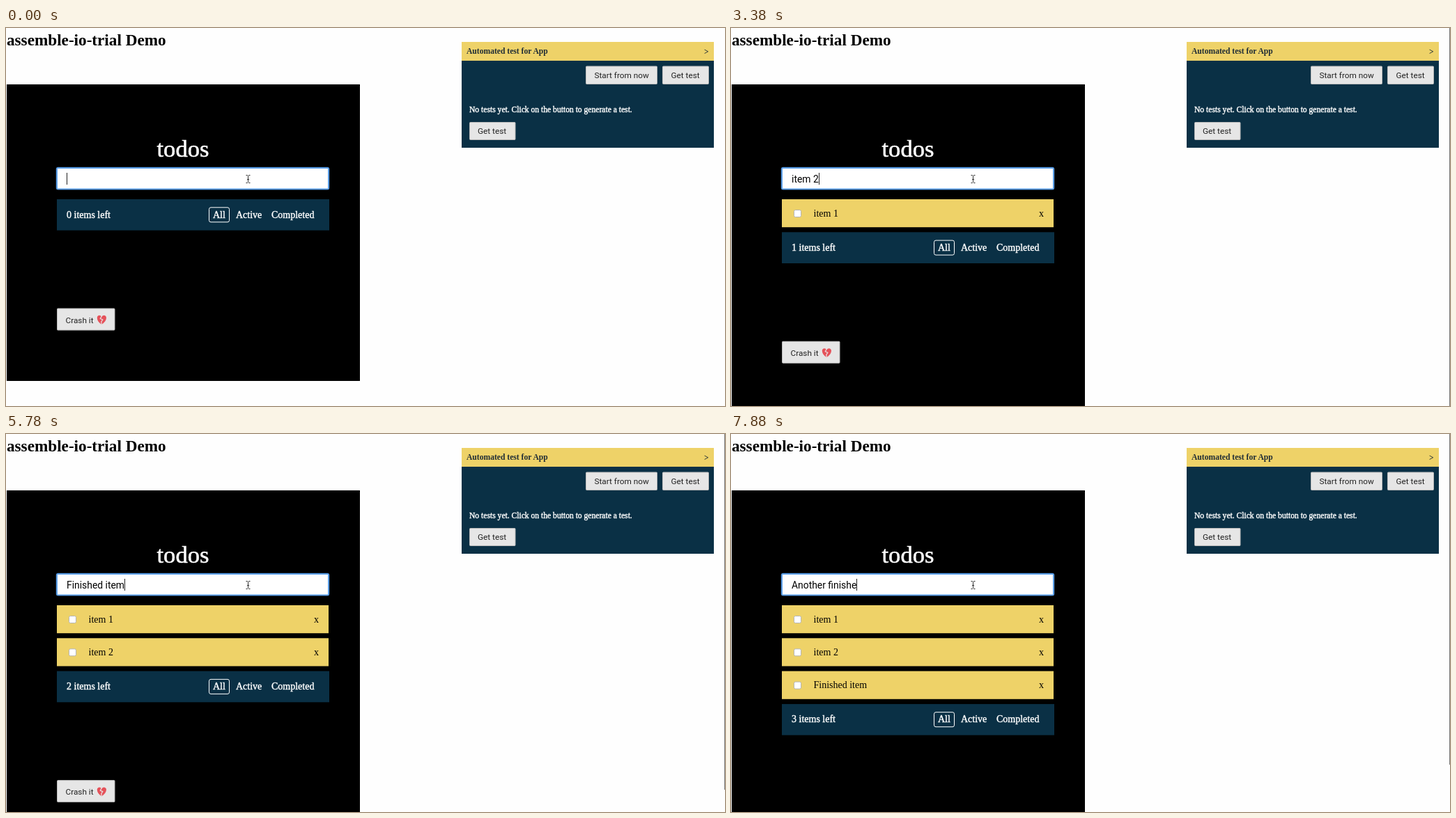
Write an HTML page that moves like this. It is 1032 px wide and 543 px high and loops after 8000 ms.

```html
<!DOCTYPE html>
<html lang="en">
<head>
<meta charset="utf-8">
<title>Todo demo</title>
<style>
  html, body { margin: 0; width: 100%; height: 100%; overflow: hidden; background: #fefefe; }
  svg { display: block; width: 1032px; height: 543px; }
  text { font: 14px "Liberation Serif", serif; white-space: pre; }
  .light { fill: #fff; stroke: #fff; stroke-width: .4px; }
  .title { font-size: 23.2px; font-weight: bold; }
  .logo { font-size: 34.6px; stroke-width: .6px; }
  .small { font-size: 11.6px; }
  .bold { font-weight: bold; fill: #1f2c35; }
  .ui { font: 11.8px Roboto, sans-serif; fill: #222; }
  .entry { font: 13.9px Roboto, sans-serif; }
  .navy { fill: #0a3045; }
  .gold { fill: #eed268; }
  .btn { fill: #e6e6e6; stroke: #b9b9b9; }
  .box { fill: #fff; stroke: #b4b4b4; }
</style>
</head>
<body>
<svg viewBox="0 0 1032 543">
  <defs>
    <g id="row">
      <rect class="gold" x="73" y="246" width="390" height="40.2"/>
      <rect class="box" x="90.5" y="261.5" width="10" height="10" rx="2"/>
      <text x="442" y="270.5">x</text>
    </g>
  </defs>
  <text class="title" x="1" y="25">assemble-io-trial Demo</text>

  <rect id="app" x="1" y="81" width="507" height="426"/>
  <text class="light logo" x="216.5" y="185">todos</text>
  <rect x="72" y="200" width="392" height="32.2" rx="2.5" fill="#5b9fe8" stroke="#5b9fe8" stroke-opacity=".35"/>
  <rect x="74" y="202" width="388" height="28.5" fill="#fff"/>
  <text class="entry" id="entry" x="87" y="221.5"></text>
  <rect id="caret" y="208" width="1" height="17" fill="#222"/>
  <path d="M344.5 211.5h2l1 1 1-1h2M347.5 212v9M344.5 222.5h2l1-1 1 1h2M346 217.5h3" fill="none" stroke="#333"/>

  <g id="rows"></g>
  <g id="foot">
    <rect class="navy" x="73" y="246" width="391" height="44.7"/>
    <text class="light" id="count" x="87" y="272.5"></text>
    <rect x="291.5" y="257.8" width="29" height="21" rx="2.5" fill="none" stroke="#fff"/>
    <text class="light" x="297" y="272.5">All</text>
    <text class="light" x="330" y="272.5">Active</text>
    <text class="light" x="381" y="272.5">Completed</text>
    <rect class="btn" x="73.5" y="403" width="82.5" height="31" rx="1"/>
    <text class="ui" x="85.5" y="423.5">Crash it</text>
    <path d="M137.3 426C133 423 130.8 420 130.8 416.5C130.8 412.5 135.3 411.5 137.3 415C139.3 411.5 144 412.5 144 416.5C144 420 141.3 423 137.3 426Z" fill="#e5525a"/>
    <path d="M137.3 414l-2 3.5 3.5 1.5-2 3 .5 4" fill="none" stroke="#e6e6e6" stroke-width="1.2"/>
  </g>

  <rect class="gold" x="654" y="20" width="362" height="27"/>
  <rect class="navy" x="654" y="47" width="362" height="125"/>
  <text class="small bold" x="661" y="37">Automated test for App</text>
  <text class="small bold" x="1002" y="37.5">&gt;</text>
  <rect class="btn" x="832.5" y="55" width="102" height="25.5" rx="1"/>
  <text class="ui" x="844.5" y="72">Start from now</text>
  <rect class="btn" x="942.5" y="55" width="66" height="25.5" rx="1"/>
  <text class="ui" x="954.5" y="72">Get test</text>
  <text class="small light" x="665" y="120.5">No tests yet. Click on the button to generate a test.</text>
  <rect class="btn" x="665.5" y="135.5" width="65.5" height="25" rx="1"/>
  <text class="ui" x="677" y="152">Get test</text>
  <rect id="thumb" x="1031" width="1" fill="#777"/>
</svg>
<script>
  const LOOP = 8000, PITCH = 47.3;
  const $ = id => document.getElementById(id);
  const items = ['item 1', 'item 2', 'Finished item'];
  const added = [2570, 3530, 5930];
  const thumbs = [0, 543, 511, 475];
  const hidden = [[450, 1080], [1520, 1820], [4130, 4430]];

  // Each entry: time of a keystroke and the text then in the field.
  const keys = [[0, '']];
  const type = (start, words, gap = 150) =>
    words.forEach((w, i) => keys.push([start + i * gap, w]));
  type(1820, ['i', 'ite', 'item ', 'item 1']);
  type(2570, ['']);
  type(2870, ['i', 'ite', 'item ', 'item 2']);
  type(3530, ['']);
  type(4430, ['F', 'Fi', 'Fin', 'Finis', 'Finish', 'Finished', 'Finished ']);
  type(5480, ['Finished i', 'Finished ite', 'Finished item', '']);
  type(6530, ['A', 'Ano', 'Anot', 'Anothe', 'Another ', 'Another fi']);
  type(7580, ['Another fin', 'Another finis', 'Another finishe']);

  const down = n => `translate(0 ${n * PITCH})`;
  $('rows').innerHTML = items.map((name, i) =>
    `<g transform="${down(i)}"><use href="#row"/><text x="118.5" y="270.5">${name}</text></g>`).join('');
  const rows = [...$('rows').children];

  function draw(now) {
    const t = now % LOOP;
    const n = added.filter(a => t >= a).length;
    rows.forEach((row, i) => row.setAttribute('visibility', i < n ? 'visible' : 'hidden'));
    $('foot').setAttribute('transform', down(n));
    $('app').setAttribute('height', 426 + n * PITCH);
    $('thumb').setAttribute('height', thumbs[n]);
    $('count').textContent = n + ' items left';

    const text = keys.filter(k => t >= k[0]).pop()[1];
    $('entry').textContent = text;
    const width = text ? $('entry').getComputedTextLength() : 0;
    $('caret').setAttribute('x', Math.round(87 + width));
    const off = hidden.some(([a, b]) => t >= a && t < b);
    $('caret').setAttribute('visibility', off ? 'hidden' : 'visible');
  }

  const start = performance.now();
  function tick() {
    draw(performance.now() - start);
    requestAnimationFrame(tick);
  }
  tick();
</script>
</body>
</html>
```
